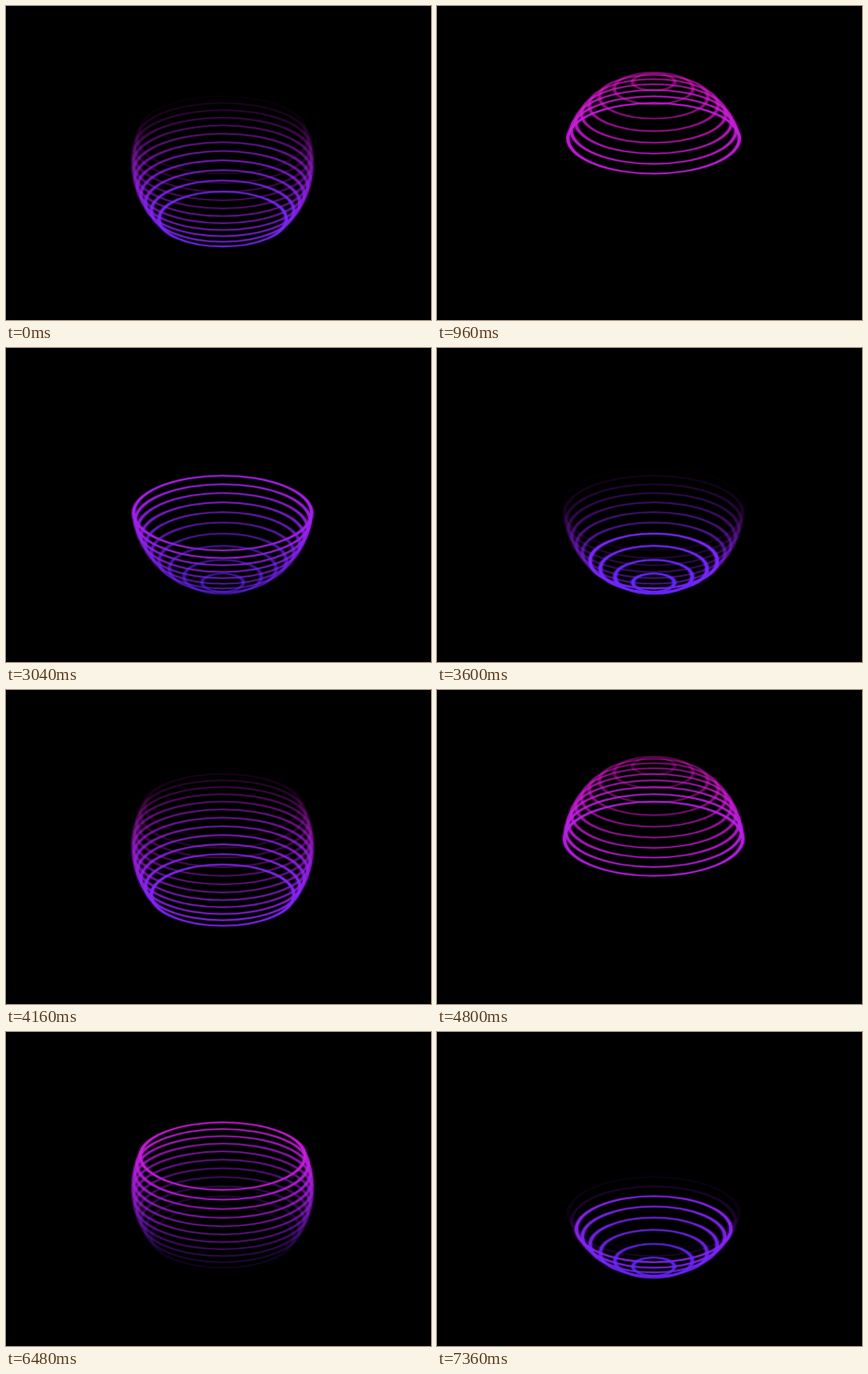
Recreate the animation shown at these times as an HTML page with a canvas. Size 460 by 340 pixels, loop 7.44 s.

```html
<!DOCTYPE html>
<html lang="en">
<head>
<meta charset="utf-8">
<title>Ring sphere</title>
<style>
  html, body { margin: 0; width: 100%; height: 100%; overflow: hidden; background: #000; }
  canvas { display: block; width: 460px; height: 340px; }
</style>
</head>
<body>
<canvas id="stage" width="460" height="340"></canvas>
<script>
const ctx = document.getElementById('stage').getContext('2d');

const LOOP = 7440, STEP = 80;      // whole loop, picture interval
const CYCLE = 4000;                // one trip up and down the sphere
const FADE = 1160;                 // fade-in before a ring cuts out
const LAST = 20;
const STAGGER = CYCLE / 42;
const UP_START = -215, DOWN_START = 1996;
const CX = 234.5, CY = 169, RADIUS = 97;
const SIN = 0.418, COS = 0.908;    // tilt towards the viewer
const VIEW = 4000;                 // viewing distance
const TOP = [255, 25, 210], BOTTOM = [100, 40, 255];

const zoom = depth => VIEW / (VIEW - depth);

// Height on screen of a ring's edge: side 1 is the front, -1 the back.
function edgeY(z, size, side) {
  const y = RADIUS * (size * side * SIN - z * COS);
  const depth = RADIUS * (size * side * COS + z * SIN);
  return CY + y * zoom(depth);
}

function ringColor(z) {
  const mix = TOP.map((c, k) => Math.round(BOTTOM[k] + (c - BOTTOM[k]) * (z + 1) / 2));
  return `rgb(${mix})`;
}

const rings = Array.from({ length: LAST + 1 }, (_, i) => {
  const pole = i === 0 || i === LAST;
  const z = pole ? Math.sign(10 - i) * 0.975 : (10 - i) / 10;
  const size = pole ? 0.234 : Math.sqrt(1 - z * z);
  const front = edgeY(z, size, 1), back = edgeY(z, size, -1);
  const rx = RADIUS * size * zoom(RADIUS * z * SIN);
  return {
    y: (front + back) / 2,
    rx,
    flat: (front - back) / 2 / rx,
    color: ringColor(z),
    cuts: [UP_START + STAGGER * (LAST - i), DOWN_START + STAGGER * i]
  };
});

// Rises evenly to 1, then drops at once when the cut time passes.
function brightness(time, cut) {
  const left = (((cut - time) % CYCLE) + CYCLE) % CYCLE;
  return Math.max(0, 1 - left / FADE);
}

// The line lies in the ring's plane, so it is squashed along with it.
function strokeRing(ring, width, alpha) {
  ctx.save();
  ctx.translate(CX, ring.y);
  ctx.scale(1, ring.flat);
  ctx.globalAlpha = alpha;
  ctx.lineWidth = width;
  ctx.strokeStyle = ring.color;
  ctx.beginPath();
  ctx.arc(0, 0, ring.rx, 0, Math.PI * 2);
  ctx.stroke();
  ctx.restore();
}

function draw(time) {
  ctx.fillStyle = '#000';
  ctx.fillRect(0, 0, 460, 340);
  for (const ring of rings) {
    for (const cut of ring.cuts) {
      const b = brightness(time, cut);
      if (b > 0) {
        strokeRing(ring, 7, 0.22 * b);
        strokeRing(ring, 3.6, 0.95 * b);
      }
    }
  }
}

const start = performance.now();
function tick() {
  const time = (performance.now() - start) % LOOP;
  draw(Math.floor(time / STEP) * STEP);
  requestAnimationFrame(tick);
}
tick();
</script>
</body>
</html>
```
